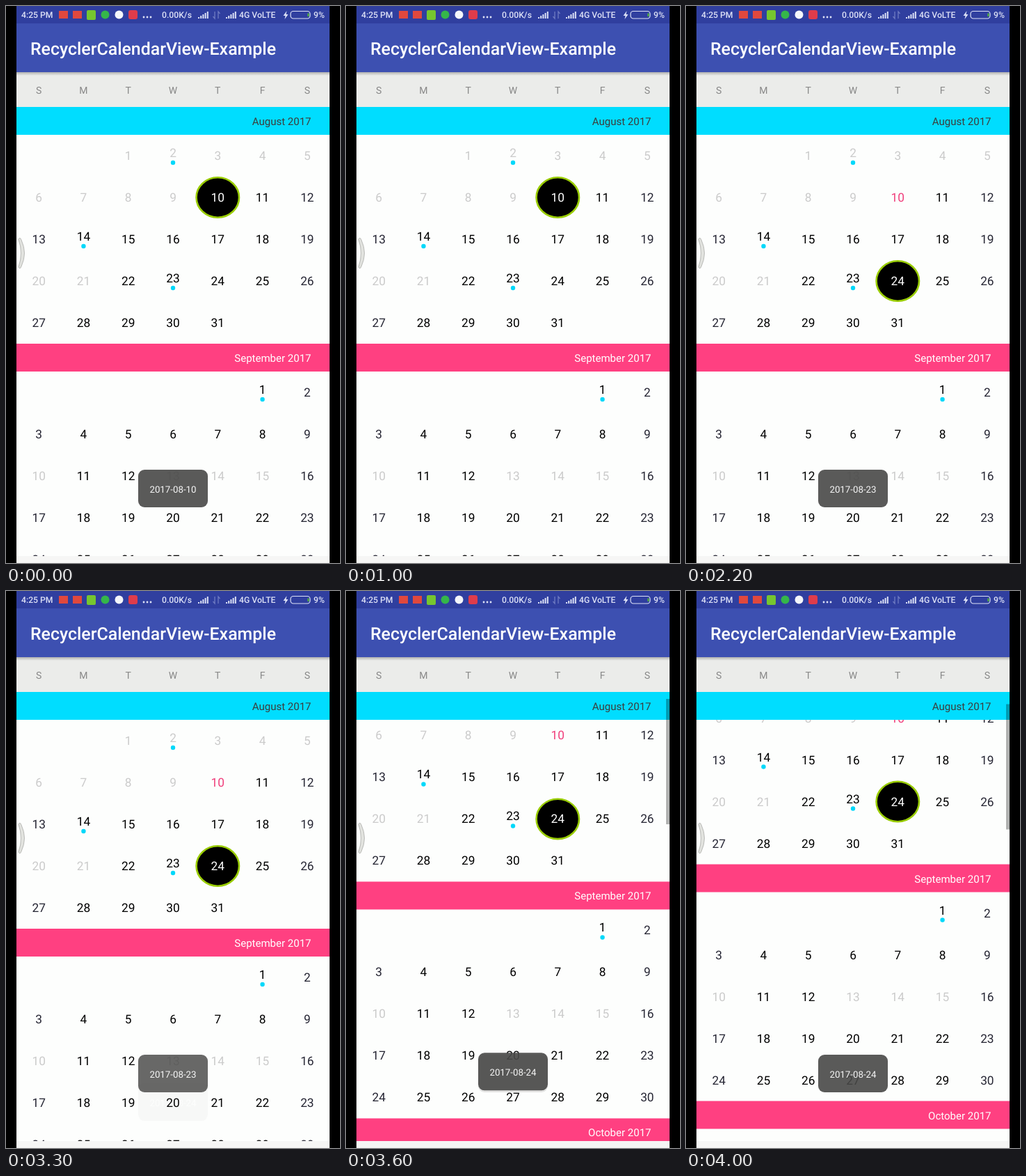
Animation, 480 px wide and 800 px high, one loop 4.1 s. Source, as an HTML page:

```html
<!DOCTYPE html>
<html lang="en">
<head>
<meta charset="utf-8">
<title>Calendar</title>
<style>
  html, body { margin: 0; width: 100%; height: 100%; overflow: hidden; background: #000; }
  svg { display: block; width: 480px; height: 800px; }
  text { font-family: Roboto, "Noto Sans", sans-serif; text-rendering: geometricPrecision; }
  .mid { text-anchor: middle; }
  .end { text-anchor: end; }
  .status { font-size: 12.2px; font-weight: 500; fill: #dde1f6; }
  .title { font-size: 24.9px; font-weight: 500; fill: #fff; }
  .weekday { font-size: 14px; fill: #878787; }
  .month { font-size: 15px; fill: #fff; }
  .month.current { fill: #3c3c3c; }
  .day { font-size: 17.3px; fill: #000; }
  .weekend { fill: #262634; }
  .today { fill: #f03f7c; }
  .off { fill: #cbcbcb; }
  .picked { fill: #fff; }
  .toast text { font-size: 13.3px; fill: #f6f6f6; }
</style>
</head>
<body>
<svg viewBox="0 0 480 800">
  <defs>
    <clipPath id="listClip"><rect x="15" y="145" width="450" height="645"/></clipPath>
    <linearGradient id="shadow" x2="0" y2="1">
      <stop stop-color="#000" stop-opacity=".25"/>
      <stop offset="1" stop-color="#000" stop-opacity="0"/>
    </linearGradient>
  </defs>
  <rect width="480" height="800"/>
  <rect x="15" width="450" height="800" fill="#f6f6f5"/>
  <g clip-path="url(#listClip)">
    <rect x="15" y="145" width="450" height="645" fill="#fdfefd"/>
    <g id="list">
      <ellipse id="ring" rx="30.7" ry="28.7" stroke="#99cc00" stroke-width="2.6"/>
    </g>
    <g id="sticky"></g>
    <rect id="thumb" x="460" width="5" height="180" fill="#000" opacity=".3"/>
  </g>
  <g id="week"><rect x="15" y="95" width="450" height="50" fill="#ebecea"/></g>
  <rect x="15" y="95" width="450" height="5" fill="url(#shadow)"/>
  <rect x="15" y="25" width="450" height="70" fill="#3d50b1"/>
  <rect x="15" width="450" height="25" fill="#303f9f"/>
  <text class="title" x="35" y="70">RecyclerCalendarView-Example</text>

  <g id="status">
    <rect x="76" y="7" width="13" height="11" fill="#e0483e"/>
    <rect x="96" y="7" width="13" height="11" fill="#e0483e"/>
    <rect x="116" y="6" width="13" height="14" rx="2" fill="#76c62f"/>
    <circle cx="142.5" cy="12.5" r="6" fill="#35b64a"/>
    <circle cx="162.5" cy="12.5" r="6" fill="#f4f6fb"/>
    <rect x="176" y="6" width="13" height="13" rx="3" fill="#df3c4b"/>
    <path d="M198 16h.01M203 16h.01M208 16h.01" stroke="#dde1f6" stroke-width="2.8" stroke-linecap="round"/>
    <path d="M300 8v10l-2.5-3M305 18V8l2.5 3" fill="none" stroke="#6f7bc2" stroke-width="1.3"/>
    <path d="M403.5 7l-5 7h3l-1 5 5-7h-3z" fill="#dde1f6"/>
    <rect x="409" y="7.5" width="28" height="10.5" rx="4" fill="none" stroke="#dde1f6" stroke-width="1.2"/>
    <path d="M434.5 10.5v4.5" stroke="#58c436" stroke-width="2"/>
  </g>
  <path d="M18 335Q20 331 22 336Q31 355 22 374Q20 379 18 375Q25 355 18 335Z" fill="#e2e3df" stroke="#b9bab7"/>
  <g id="toasts"></g>
</svg>
<script>
const LOOP = 4100, STEP = 100;
const $ = id => document.getElementById(id);

function add(parent, tag, attrs, content = '') {
  const node = document.createElementNS('http://www.w3.org/2000/svg', tag);
  for (const key in attrs) node.setAttribute(key, attrs[key]);
  node.textContent = content;
  return parent.appendChild(node);
}
const label = (parent, cls, x, y, content) => add(parent, 'text', { class: cls, x, y }, content);
const columnX = col => 15 + 450 / 7 * (col + .5);

// Status bar
label($('status'), 'status', 22, 17, '4:25 PM');
label($('status'), 'status', 224, 17, '0.00K/s');
label($('status'), 'status', 335, 17, '4G VoLTE');
label($('status'), 'status', 442, 17, '9%');
for (const left of [276, 316])
  for (let i = 0; i < 5; i++) {
    const height = 2 + i * 2;
    add($('status'), 'rect', { x: left + i * 3.2, y: 18 - height, width: 2, height, fill: '#dde1f6' });
  }

[...'SMTWTFS'].forEach((letter, col) => label($('week'), 'weekday mid', columnX(col), 126, letter));

// Month lists
function monthHeader(parent, top, name, current) {
  add(parent, 'rect', { x: 15, y: top, width: 450, height: 40, fill: current ? '#00ddff' : '#ff4081' });
  label(parent, 'month end' + (current ? ' current' : ''), 438.5, top + 26, name);
}

const augustDays = {};
function monthDays(top, count, firstCol, off, dots, store) {
  for (let day = 1; day <= count; day++) {
    const slot = day - 1 + firstCol, col = slot % 7;
    const x = columnX(col), y = top + 30 + Math.floor(slot / 7) * 60;
    const marked = dots.includes(day);
    const cls = off(day) ? 'off' : col % 6 ? '' : 'weekend';
    const node = label($('list'), `day mid ${cls}`, x, y + (marked ? 2 : 6), day);
    if (marked) add($('list'), 'circle', { cx: x, cy: y + 10, r: 3.2, fill: '#00d8fa' });
    if (store) store[day] = { node, x, y };
  }
}
monthDays(185, 31, 2, d => d < 10 || d === 20 || d === 21, [2, 14, 23], augustDays);
monthHeader($('list'), 485, 'September 2017');
monthDays(525, 30, 5, d => d === 10 || (d > 12 && d < 16), [1]);
monthHeader($('list'), 825, 'October 2017');
monthHeader($('sticky'), 145, 'August 2017', true);
augustDays[10].node.classList.add('today');

// Toasts
const toasts = [
  { date: '2017-08-10', from: -LOOP, to: 564 },
  { date: '2017-08-23', from: 1464, to: 3264 },
  { date: '2017-08-24', from: 3264, to: 2 * LOOP }
];
for (const toast of toasts) {
  toast.node = add($('toasts'), 'g', { class: 'toast' });
  add(toast.node, 'rect', { x: 190, y: 666, width: 100, height: 54, rx: 9, fill: '#494948', 'fill-opacity': .9 });
  label(toast.node, 'mid', 240, 699, toast.date);
}

const clamp = v => Math.min(1, Math.max(0, v));
const overshoot = p => (p - 1) ** 2 * (3 * (p - 1) + 2) + 1;

function draw(t) {
  const picked = t < 1200 ? 10 : t < 2100 ? 23 : 24;
  for (const day of [10, 23, 24]) augustDays[day].node.classList.toggle('picked', day === picked);
  const { x, y } = augustDays[picked];
  $('ring').setAttribute('transform', `translate(${x} ${y})`);

  const scroll = 92.5 * (1 - (1 - clamp((t - 3300) / 500)) ** 1.43);
  $('list').setAttribute('transform', `translate(0 ${-scroll})`);
  $('thumb').setAttribute('y', Math.max(145, 155 + (scroll - 67.5) * .3));
  $('thumb').setAttribute('visibility', scroll > 0 ? 'visible' : 'hidden');

  for (const { node, from, to } of toasts) {
    const enter = clamp((t - from) / 400), leave = clamp((t - to) / 400);
    node.setAttribute('transform', `translate(0 ${68 * (1 - overshoot(enter))})`);
    node.setAttribute('opacity', Math.min(1, (2 * enter) ** 2) * (1 - leave));
  }
}

const start = performance.now();
function frame() {
  draw(Math.floor((performance.now() - start) % LOOP / STEP) * STEP);
  requestAnimationFrame(frame);
}
frame();
</script>
</body>
</html>
```
